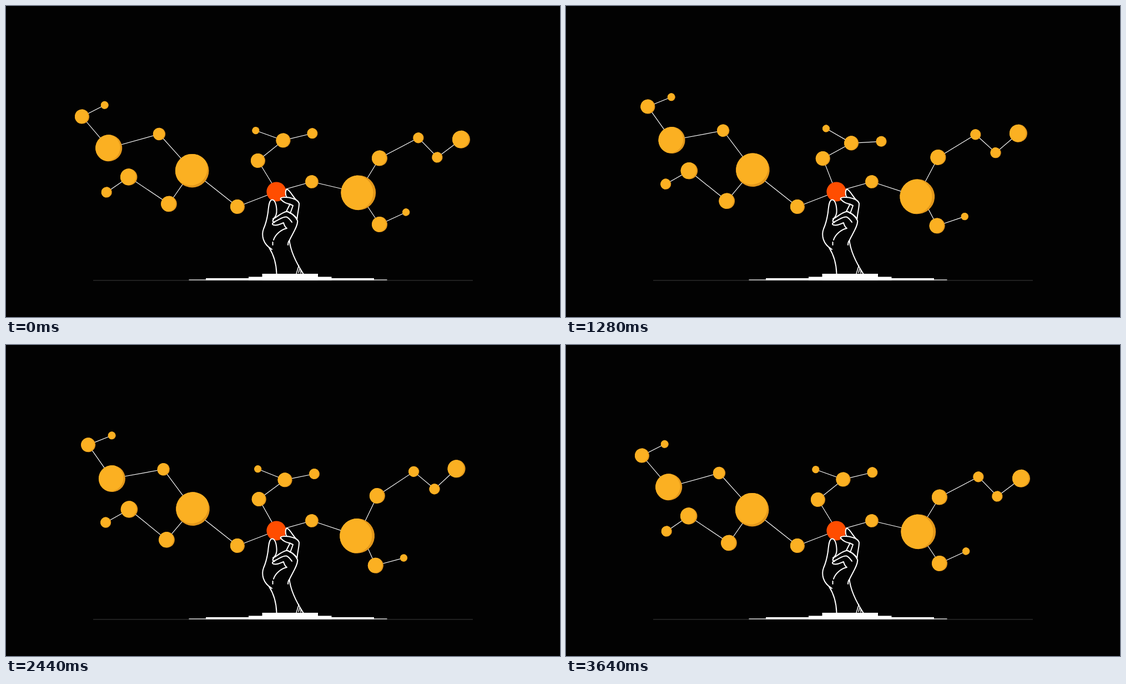
An HTML page that plays this animation: 998 px wide and 561 px high, repeating every 3.68 s.

```html
<!DOCTYPE html>
<html lang="en">
<head>
<meta charset="utf-8">
<title>Molecule in hand</title>
<style>
  html, body { margin: 0; width: 100%; height: 100%; overflow: hidden; background: #020202; }
  svg { display: block; width: 100vw; height: 100vh; }
  .link { stroke: #fff; stroke-width: 1.15; }
  .hand { fill: none; stroke: #fff; stroke-width: 2; stroke-linecap: round; stroke-linejoin: round; }
  .skin { fill: #020202; }
</style>
</head>
<body>
<svg viewBox="0 0 998 561">
  <g id="net"></g>
  <circle cx="487" cy="335" r="17.6" fill="#ff4d00"/>
  <g class="hand">
    <path class="skin" d="M505 344C503 339 503 332 506 330.5C510 331 515 341 522 349L513 350Z"/>
    <path class="skin" d="M481 384C486 381 488 374 487.5 367C487 357 484 349 479 349.5C474 350 473 362 472 372C470 386 468 393 464 402C460 413 462 429 479 439"/>
    <path class="skin" d="M505 370.5L511.5 357.5C505 356 500 354.5 494.500 348C494 345 504 344 512 346C520 348 526 350 528 356C528 365 525 374 524.5 384C519 377 512 372 505 370.5Z"/>
    <path d="M511.5 357.5L517 360L512 374"/>
    <path d="M481 384C489 381 493 374 506 370.5C514 373 522 380 525 387C527 395 516 411 510.5 423C508.5 425 508 428 508 431"/>
    <path d="M482 385C479 388 481 390 484 389C492 386 497 380 505 380.5C510 382 512 386 515 390"/>
    <path d="M484 390C479 391 479 394 482 395C490 397 494 393 500 391C501 395 503 399 506 401C496 403 485 412 482 422M480.5 426V431"/>
    <path d="M474 436C483 450 487 466 487.5 483M510.5 423C513 445 524 465 535.5 483"/>
    <path stroke-width="1.5" d="M527.5 468L523 483M529 474L527 481M531 476V482"/>
  </g>
  <path d="M157 495H841" stroke="#3c3c3c"/>
  <g id="base" fill="#fff"></g>
</svg>
<script>
const NS = 'http://www.w3.org/2000/svg';
const LOOP = 3680;
const net = document.getElementById('net');
const base = document.getElementById('base');

function add(parent, tag, attrs = {}) {
  const el = document.createElementNS(NS, tag);
  for (const key in attrs) el.setAttribute(key, attrs[key]);
  return parent.appendChild(el);
}

// The plinth: each step is narrower and taller than the one below.
function step(x, width, y) {
  add(base, 'rect', { x, width, y, height: 494.6 - y });
}
step(329.5, 357, 493.4);
step(360, 303, 491);
step(437, 149.5, 488.5);
step(461.5, 100.5, 483);

const ball = (x, y, r = 0, tilt = 12) => ({ x, y, r, tilt });

// A disc with a darker crescent on the side given by tilt (degrees).
function drawBall(parent, { x, y, r, tilt }) {
  const d = r * 0.15, h = Math.sqrt(r * r - d * d / 4);
  const arc = `A${r} ${r} 0 0 1 ${-d / 2} `;
  const g = add(parent, 'g', { transform: `translate(${x} ${y}) rotate(${tilt})` });
  add(g, 'circle', { r, fill: '#e2971b' });
  add(g, 'path', { d: `M${-d / 2} ${-h}${arc}${h}${arc}${-h}Z`, fill: '#fbb022' });
}

// Chains of balls: neighbours are linked, and a ball may start several chains.
function limb(...chains) {
  const g = add(net, 'g');
  for (const chain of chains) {
    chain.slice(1).forEach((b, i) => {
      const a = chain[i];
      add(g, 'line', { x1: a.x, y1: a.y, x2: b.x, y2: b.y, class: 'link' });
    });
  }
  for (const b of new Set(chains.flat())) if (b.r) drawBall(g, b);
  return g;
}

// Zero-radius copy: a link may start there without drawing the ball again.
const anchor = b => ball(b.x, b.y);

const core = ball(487, 335);
const elbowL = ball(417, 362, 13), elbowR = ball(551, 317, 11.8);
const hubL = ball(335.2, 297.2, 30.3, 55), hubR = ball(634.8, 336.8, 31.4, 0);
const fork = ball(499.5, 242.5, 13);

const crown = limb(
  [ball(484, 328), ball(454, 279, 13), fork, ball(450, 224.7, 6.6)],
  [fork, ball(552, 229.8, 9.5)]);
const rightTop = limb(
  [anchor(hubR), ball(673, 274.5, 14), ball(743, 237.8, 9.6), ball(777, 273, 9.6), ball(820, 240.7, 16)]);
const rightLow = limb([anchor(hubR), ball(673, 394, 14), ball(720.7, 372, 6.7)]);
const rightHub = limb([anchor(elbowR), hubR]);

limb([anchor(hubL), elbowL, core, elbowR]);

const left = limb(
  [hubL, ball(276, 231, 11.2), ball(185.2, 256.2, 24), ball(137, 199.5, 13), ball(177.8, 178.8, 7)],
  [hubL, ball(293.5, 357, 14.3), ball(221.2, 308.5, 15.2), ball(181.3, 336, 9.6)]);

// Cubic timing curve with handles (x1, 0) and (x2, 1).
function ease(u, [x1, x2]) {
  if (u <= 0) return 0;
  if (u >= 1) return 1;
  let lo = 0, hi = 1, s = 0.5;
  for (let i = 0; i < 24; i++) {
    s = (lo + hi) / 2;
    const q = 1 - s;
    if (3 * q * s * (q * x1 + s * x2) + s * s * s < u) lo = s; else hi = s;
  }
  return s * s * (3 - 2 * s);
}

const SOFT = [0.42, 0.42], SINE = [0.37, 0.63], TRAIL = [0.5, 0.1];

// 0 to 1 between start and peak, back to 0 between peak and end.
function swing(t, start, peak, end, out = SOFT, back = SOFT) {
  return t < peak
    ? ease((t - start) / (peak - start), out)
    : 1 - ease((t - peak) / (end - peak), back);
}

function turn(g, angle, x, y) {
  g.setAttribute('transform', `rotate(${angle.toFixed(4)} ${x} ${y})`);
}

function draw(t) {
  const first = swing(t, 40, 1540, 3360, SOFT, TRAIL);
  const second = swing(t, 640, 1900, 3200, SINE);
  const third = swing(t, 830, 1990, 3190);
  turn(crown, 10.7 * first, 479.8, 325.8);
  turn(left, 9.6 * second, 352.5, 311);
  turn(rightHub, 9.55 * second, elbowR.x, elbowR.y);
  turn(rightTop, -9.4 * third, 647.7, 313.5);
  turn(rightLow, 15.3 * third, 647, 353.5);
}

let origin = null;
function tick(now) {
  if (origin === null) origin = now;
  draw((now - origin) % LOOP);
  requestAnimationFrame(tick);
}
draw(0);
requestAnimationFrame(tick);
</script>
</body>
</html>
```
